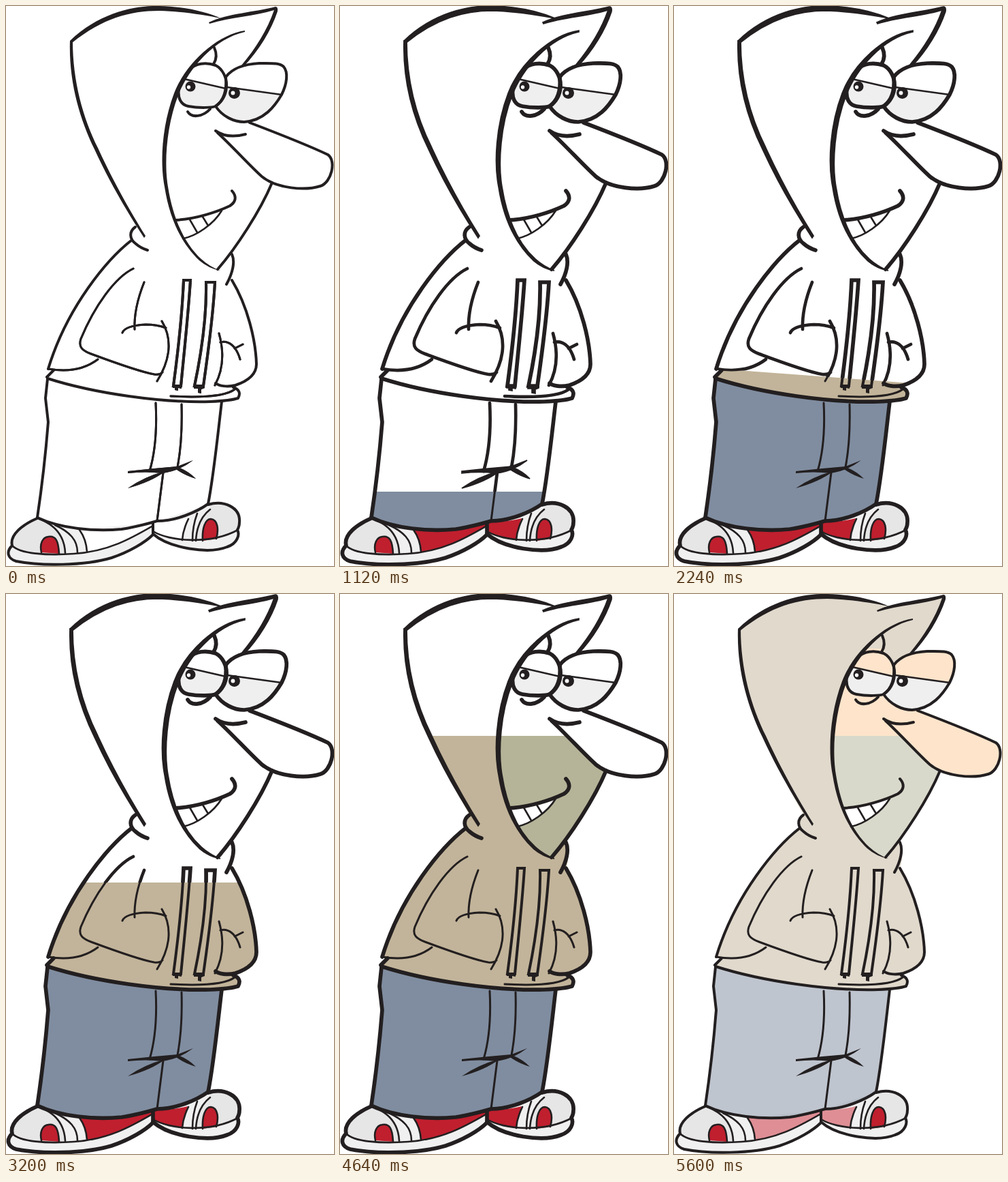
These frames come from a looping animation (482 by 821 pixels, 5.76 s). An HTML page:

```html
<!DOCTYPE html>
<html lang="en">
<head>
<meta charset="utf-8">
<title>Hooded character</title>
<style>
html, body { margin: 0; width: 100%; height: 100%; overflow: hidden; background: #fff; }
svg { display: block; width: 100%; height: 100%; --extra: 0px; }
.ink { fill: none; stroke: #231f20; stroke-linecap: round; stroke-linejoin: round; stroke-width: calc(var(--w) + var(--extra)); }
.solid { fill: #231f20; stroke: #231f20; stroke-width: var(--extra); }
.thin { --extra: 0px; }
.cloth { fill: #c2b49a; }
.skin { fill: #fdcb99; }
.red { fill: #c01f2e; }
</style>
</head>
<body>
<svg id="stage" viewBox="0 0 482 821">
  <defs>
    <clipPath id="below"><polygon id="belowEdge"/></clipPath>
    <clipPath id="above"><polygon id="aboveEdge"/></clipPath>
    <clipPath id="skinClip"><rect id="skinEdge" width="482" height="821"/></clipPath>
    <path id="face" d="M306 61C283 77 263 100 250 130C232 175 228 230 235 265C243 315 262 350 285 372C295 380 303 384 311 386C338 355 374 300 391 259L358 171L345 170L322 104L308 87Q311 72 306 61Z"/>
    <path id="nose" d="M311 186C330 203 360 236 376 250C398 268 440 271 462 264C478 259 486 227 473 218C450 207 400 187 358 171"/>
    <path id="eyeL" d="M270 93C278 84 294 82 308 87C318 92 325 105 324 119C323 130 318 140 308 147C303 149 285 150 268 147C257 145 252 135 254 121"/>
    <path id="eyeR" d="M323 104C332 92 350 85 372 84C390 84 402 83 408 89C415 97 413 114 405 130C395 147 379 168 350 170C335 170 318 162 308 147C318 140 325 128 323 104Z"/>
    <path id="redL" d="M116 768Q170 769 215 758L216 762C185 782 150 797 119 801Q118 782 108 768Z"/>
    <path id="redR" d="M217 757Q248 756 267 751Q260 770 259 783Q235 780 217 770Z"/>
  </defs>

  <!-- shoes: soles, then uppers -->
  <g fill="#f0f0f0">
    <path d="M9 791C0 800 2 810 15 814C50 821 115 821 155 809C182 800 205 786 216 775V758L100 768L46 751Z"/>
    <path d="M216 757L297 731L340 768C344 775 340 788 325 793C298 804 240 795 216 774Z"/>
  </g>
  <g fill="#e6e6e6">
    <path d="M9 791C5 775 25 760 46 751C72 760 86 777 87 802C60 806 20 803 9 791Z"/>
    <path d="M300 732C320 724 345 735 343 757Q343 763 340 768C326 780 302 785 279 784C280 765 287 748 300 738Z"/>
  </g>
  <g fill="#fff"><use href="#redL"/><use href="#redR"/></g>

  <g id="paint">
    <g clip-path="url(#below)">
      <g class="red"><use href="#redL"/><use href="#redR"/></g>
      <path fill="#808da0" d="M61 547L58 575L62 610C58 660 52 710 46 750C80 766 130 771 170 767C190 764 205 760 222 755C250 755 280 742 297 730C305 690 311 630 317 579Z"/>
      <path class="cloth" d="M190 323C180 330 182 340 185 343C150 370 90 440 62 532L70 534L60 545C130 570 230 582 300 580C320 579 335 577 341 575C345 568 343 562 334 558C355 550 368 540 368 525C367 490 355 440 332 402C336 390 337 375 332 364L310 386Z"/>
      <path class="cloth" d="M96 51C140 13 185 3 225 3C260 4 290 10 313 18C340 13 370 10 394 3Q401 1 396 13C388 35 370 65 348 88L323 104L240 200L311 386L208 358L190 323C173 294 152 252 132 209C110 165 94 110 96 51Z"/>
    </g>
    <g class="skin" clip-path="url(#skinClip)">
      <use href="#face"/><use href="#nose"/><use href="#eyeL"/><use href="#eyeR"/>
    </g>
    <path clip-path="url(#below)" fill="#b5b498" d="M230 208H332C350 226 368 246 391 259C374 300 338 355 311 386C303 384 295 380 285 372C262 350 243 315 235 265Q230 235 230 208Z"/>
  </g>

  <!-- parts that keep their colour all the time -->
  <path fill="#fff" d="M249 315C275 312 298 307 317 299C305 320 280 337 260 341Q253 330 249 315Z"/>
  <g fill="#efefef">
    <path d="M262 108L323 121C322 131 317 140 308 147C303 149 285 150 268 147C257 145 252 135 254 121Z"/>
    <path d="M324 119L405 130C395 147 379 168 350 170C335 170 318 162 308 147Q322 136 324 119Z"/>
  </g>
  <path class="red" d="M52 801C49 788 54 779 62 778C73 776 77 784 78 803Z"/>
  <path class="red" d="M289 784C288 765 293 752 301 752C311 753 313 767 309 781Z"/>

  <g class="thin">
    <g id="detail">
      <g class="ink" style="--w:3px">
        <!-- sleeves and pocket -->
        <path d="M187 385C160 398 130 440 110 488C106 500 112 505 125 510C160 523 200 537 218 540Q226 541 230 537M229 462C243 485 244 515 222 550"/>
        <path d="M171 479C174 471 188 468 205 467Q222 467 235 472M203 405C195 425 188 450 189 474"/>
        <path d="M62 532C90 537 115 533 135 518"/>
        <path d="M313 480C320 505 320 532 307 556M315 493C326 490 338 497 344 518M348 496L336 502"/>
        <path d="M242 572C280 574 322 573 336 562"/>
        <!-- trousers -->
        <path d="M220 582C222 620 219 655 211 682M258 584C259 620 257 650 252 676M231 684L222 755"/>
      </g>
      <g class="ink" style="--w:4px;stroke-linejoin:miter">
        <path d="M261 402H271C268 450 262 505 257 557H246C253 505 259 450 261 402Z"/>
        <path d="M294 405H307C304 460 296 515 290 557H277C288 505 295 450 294 405Z"/>
      </g>
      <g class="solid">
        <path d="M179 682Q215 678 252 675L275 666Q254 682 230 685Q205 682 179 685Z"/>
        <path d="M179 707Q203 690 234 682Q215 697 179 707Z"/>
        <path d="M250 675Q267 681 279 693Q262 688 250 679Z"/>
        <path d="M245 556H258V561L253 560V564L248 563V560H245Z"/>
        <path d="M276 556H292V560L287 562V568L282 567V561H276Z"/>
      </g>
    </g>
  </g>
  <use href="#detail" clip-path="url(#above)"/>

  <!-- tapering hood lines -->
  <g class="solid">
    <path d="M94 51C138 9 190 -1 225 0C265 1 295 9 316 18C290 13 260 8 225 7C182 7 142 18 97 54Z"/>
    <path d="M298 24C325 11 366 9 396 1Q400 1 399 8C390 35 372 65 349 89L346 87C367 62 384 35 394 6C366 15 330 16 299 26Z"/>
    <path d="M351 36C310 42 264 84 247 128C229 175 226 230 233 265C241 317 261 351 284 373Q298 385 315 388Q299 382 287 371C264 350 246 315 238 265C232 230 236 175 253 131C268 92 306 48 351 38Z"/>
    <path d="M94 51C92 110 108 165 130 210C152 258 178 302 203 340L205 337C183 302 158 258 135 208C113 164 98 110 98 51Z"/>
  </g>

  <g class="ink" style="--w:4px">
    <path d="M190 324C180 331 182 342 190 348Q198 355 208 358M332 364C337 375 333 392 324 408"/>
    <path d="M185 343C150 370 90 440 62 532M70 534L60 544"/>
    <path d="M332 402C355 440 367 490 368 525C368 540 355 550 337 556C325 559 313 557 308 553"/>
    <path d="M61 546C130 568 230 582 300 580C320 579 335 577 341 575C345 568 343 562 334 559"/>
    <path d="M61 547L58 575L62 610C58 660 52 710 46 750M317 580C311 630 305 690 297 730"/>
    <path d="M46 750C80 766 130 771 170 767C190 764 205 760 222 755C250 755 280 742 297 730"/>
    <path d="M391 259C374 300 338 355 311 386"/>
    <use href="#nose"/><use href="#eyeL"/><use href="#eyeR"/>
    <path d="M306 61Q312 74 305 85"/>
    <path d="M308 183Q325 195 352 188"/>
    <path d="M249 314C280 312 310 302 329 293C337 288 340 280 332 271"/>
    <path d="M267 155C273 165 290 162 300 151"/>
    <!-- shoes -->
    <path d="M46 751C25 760 5 775 9 791C0 800 2 810 15 814C50 821 115 821 155 809C182 800 205 786 216 775V758"/>
    <path d="M297 731C320 724 345 735 343 757Q343 763 340 768C344 775 340 788 325 793C298 804 240 795 216 774"/>
  </g>

  <g class="ink thin" style="--w:2.6px">
    <path d="M262 107L323 121M325 119L405 130"/>
    <path d="M260 341C280 337 305 320 317 300M270 313L281 332M289 309L297 322"/>
    <path d="M9 791C20 803 60 806 100 803C150 800 185 780 216 762M216 770C240 785 300 790 341 768"/>
    <path d="M52 801C49 788 54 779 62 778C73 776 77 784 78 803M289 784C288 765 293 752 301 752C311 753 313 767 309 781"/>
    <path d="M46 751C72 760 86 777 87 802M72 761C94 771 105 783 105 801M108 768Q118 782 119 800"/>
    <path d="M268 752Q260 768 259 783M281 744Q274 762 274 784M300 738C287 748 280 765 279 784"/>
  </g>

  <g class="solid thin">
    <circle cx="271" cy="118" r="7.5"/><circle cx="335.5" cy="127.5" r="8.5"/>
  </g>
  <g fill="#fff">
    <circle cx="268.5" cy="119" r="2.7"/><circle cx="333.5" cy="127.5" r="2.9"/>
  </g>
</svg>
<script>
const W = 482, H = 821, STEP = 160, COUNT = 36;
// [step, left edge, right edge] of the rising colour
const rise = [
  [0, 821, 821], [7, 712, 712], [14, 527, 563], [20, 423, 423],
  [25, 315, 333], [29, 208, 208], [34, 0, 0], [36, 0, 0]
];
const skinRise = [[0, H], [29, H], [30, 232], [34, 80], [36, 80]];
const el = id => document.getElementById(id);

function at(keys, step, col) {
  const i = keys.findIndex(k => k[0] > step);
  const a = keys[i - 1], b = keys[i];
  return a[col] + (b[col] - a[col]) * (step - a[0]) / (b[0] - a[0]);
}

function draw(step) {
  const edge = `0,${at(rise, step, 1)} ${W},${at(rise, step, 2)} `;
  const faded = step === COUNT - 1;
  el("belowEdge").setAttribute("points", `${edge}${W},${H} 0,${H}`);
  el("aboveEdge").setAttribute("points", `${edge}${W},0 0,0`);
  el("skinEdge").setAttribute("y", at(skinRise, step, 1));
  el("paint").setAttribute("opacity", faded ? 0.5 : 1);
  // lines are heavier while the colour is rising
  el("stage").style.setProperty("--extra", faded || step === 0 ? "0px" : "1.7px");
}

let last = -1;
function tick() {
  const step = Math.floor(performance.now() / STEP) % COUNT;
  if (step !== last) draw(last = step);
  requestAnimationFrame(tick);
}
tick();
</script>
</body>
</html>
```
